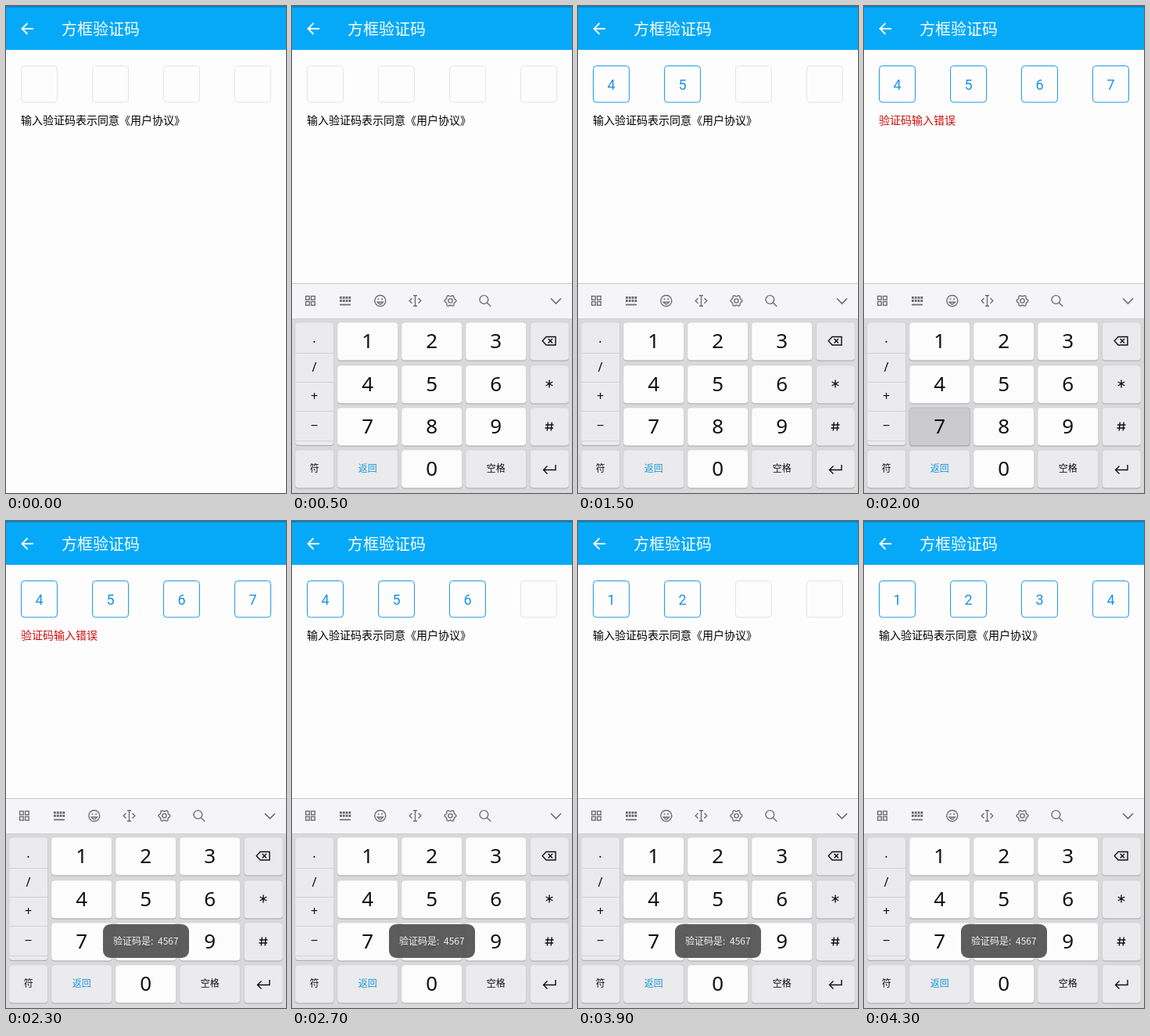
Animation, 358 px wide and 622 px high, one loop 5.3 s. Source, as an HTML page:

```html
<!DOCTYPE html>
<html lang="zh-CN">
<head>
<meta charset="utf-8">
<title>方框验证码</title>
<style>
  html, body { margin: 0; width: 100%; height: 100%; overflow: hidden; background: #fdfdfd; }
  svg { display: block; width: 358px; height: 622px; }
  text { font-family: "Noto Sans CJK SC", "Noto Sans CJK", "Noto Sans", sans-serif; }
  .digit { font: 18px Roboto, sans-serif; fill: #1c91e8; text-anchor: middle; }
  .num { font: 26px "Noto Sans", sans-serif; fill: #111; text-anchor: middle; }
  .sym { font: 16px "Noto Sans", sans-serif; fill: #111; text-anchor: middle; }
  .label { font-size: 12px; fill: #111; text-anchor: middle; }
  .icon { fill: none; stroke: #6f6f71; stroke-width: 1.4; }
  .glyph { fill: none; stroke: #111; stroke-width: 1.4; }
</style>
</head>
<body>
<svg id="stage" viewBox="0 0 358 622"></svg>
<script>
const LOOP = 5300, STEP = 100;
const NOTE = '输入验证码表示同意《用户协议》';
const ERROR = '验证码输入错误';
const COLS = [58, 140, 222], ROWS = [404, 459, 513, 567];

// [start time, entered code, pressed key]
const TIMELINE = [
  [0, '', ''],
  [1200, '', '4'], [1300, '4', ''],
  [1400, '4', '5'], [1500, '45', ''],
  [1600, '45', '6'], [1700, '456', ''],
  [2000, '4567', '7'], [2100, '4567', ''],
  [2600, '456', 'del'], [2700, '456', ''],
  [2800, '45', ''], [3000, '4', ''], [3200, '', ''],
  [3600, '', '1'], [3700, '1', ''],
  [3800, '1', '2'], [3900, '12', ''],
  [4000, '12', '3'], [4100, '123', ''],
  [4200, '123', '4'], [4300, '1234', '']
];

const range = n => [...Array(n).keys()];
const keyFill = side => side ? '#ebeaec' : '#fcfcfd';

function key(id, x, y, w, side, content = '', h = 48.5) {
  return `<rect x="${x}" y="${y + 1}" width="${w}" height="${h}" rx="4" fill="#a5a5a7"/>
    <rect id="key-${id}" data-fill="${keyFill(side)}" x="${x}" y="${y}" width="${w}" height="${h}" rx="4"
      fill="${keyFill(side)}" stroke="#c9c9cb" stroke-width=".5"/>${content}`;
}

const text = (cls, x, y, value, extra = '') =>
  `<text class="${cls}" x="${x}" y="${y}" ${extra}>${value}</text>`;

function numberKey(n) {
  const x = n ? COLS[(n - 1) % 3] : COLS[1];
  const y = ROWS[n ? Math.floor((n - 1) / 3) : 3];
  return key(n, x, y, 77.5, false, text('num', x + 38.7, y + 33, n));
}

function symbolColumn() {
  const lines = [443, 480, 517, 555].map(y => `M4 ${y}.5H53.5`).join('');
  return key('symbols', 4, 404, 49.5, true, '', 157) +
    `<path d="${lines}" stroke="#d2d1d4"/>` +
    text('sym', 28.5, 430, '.') + text('sym', 28.5, 467, '/') +
    text('sym', 28.5, 504, '+') + text('sym', 28.5, 541, '−');
}

function toolbar() {
  const grid = range(4).map(i =>
    `<rect x="${17.6 + i % 2 * 7}" y="${370.6 + (i >> 1) * 7}" width="4.6" height="4.6"/>`).join('');
  const dots = range(8).map(i =>
    `M${61 + i % 4 * 3.8} ${372.5 + (i >> 2) * 4}h2.8`).join('');
  const gear = range(72).map(i => {
    const a = i * Math.PI / 36, r = 6.5 + 0.9 * Math.cos(6 * a);
    return `${(202.5 + r * Math.cos(a)).toFixed(2)},${(376.5 + r * Math.sin(a)).toFixed(2)}`;
  }).join(' ');
  return `<rect y="354" width="358" height="45" fill="#f5f5f7"/>
    <path d="M0 354.5H358" stroke="#c8c8ca"/>
    <g class="icon">
      ${grid}
      <path d="${dots}" stroke-width="2.8"/><path d="M61 381.5h14" stroke-width="1.8"/>
      <circle cx="112.8" cy="376.5" r="7"/>
      <path d="M109 378.2q3.8 5 7.6 0z"/><path d="M109.6 374.4h1.8M114.2 374.4h1.8" stroke-width="1.8"/>
      <path d="M157.5 370v13M155 369.8h5M155 383.2h5M153.5 373.2l-3.3 3.3 3.3 3.3M161.5 373.2l3.3 3.3-3.3 3.3"/>
      <polygon points="${gear}"/><circle cx="202.5" cy="376.5" r="2.6"/>
      <circle cx="245.4" cy="375" r="5.4"/><path d="M249.3 379l5 4.8"/>
      <path d="M331 373.5l6.5 6.5 6.5-6.5" stroke-width="1.7"/>
    </g>`;
}

function sideKeys() {
  const star = range(3).map(i => {
    const a = Math.PI * (i / 3 + 0.5), dx = 5 * Math.cos(a), dy = 5 * Math.sin(a);
    return `M${329 - dx} ${482.5 - dy}L${329 + dx} ${482.5 + dy}`;
  }).join('');
  const glyph = (d, width = 1.4) => `<path class="glyph" d="${d}" stroke-width="${width}"/>`;
  const x = 304.5, w = 49.5;
  return key('del', x, 404, w, true, glyph('M325 422.5h12v10.5h-12l-4.8-5.2zM327.6 425l5.4 5.4M333 425l-5.4 5.4')) +
    key('star', x, 459, w, true, glyph(star)) +
    key('hash', x, 513, w, true, glyph('M327.3 531.5l-1 11M332.2 531.5l-1 11M324 535h10.5M323.5 539h10.5')) +
    key('enter', x, 567, w, true, glyph('M337 586v6.5h-15.5M326.5 587.5l-5 5 5 5', 1.9));
}

function keyboard() {
  return `<g id="keyboard">
    <rect y="399" width="358" height="223" fill="#d9d9db"/>
    <path d="M0 399.5H358" stroke="#cececf"/>
    ${toolbar()}${symbolColumn()}${range(10).map(numberKey).join('')}${sideKeys()}
    ${key('more', 4, 567, 49.5, true, text('label', 28.8, 595, '符'))}
    ${key('back', 58, 567, 77.5, true, text('label', 96.7, 595, '返回', 'style="fill:#1698dc"'))}
    ${key('space', 222, 567, 77.5, true, text('label', 260.7, 595, '空格'))}
  </g>`;
}

function codeBox(i) {
  const x = 19.5 + 91 * i;
  return `<rect id="box-${i}" x="${x}" y="76.5" width="46" height="46.5" rx="4" fill="none"/>
    <text id="digit-${i}" class="digit" x="${x + 23}" y="107"></text>`;
}

const stage = document.getElementById('stage');
stage.innerHTML = `
  <rect width="358" height="622" fill="#fdfdfd"/>
  <rect width="358" height="56" fill="#05a9f8"/>
  <rect width="358" height="2" fill="#0588d2"/>
  <path d="M35 29H20.5M27.5 22l-7 7 7 7" fill="none" stroke="#fff" stroke-width="1.9"/>
  <text x="71" y="36.5" font-size="20" fill="#fff">方框验证码</text>
  ${range(4).map(codeBox).join('')}
  <text id="note" x="19" y="151" font-size="14"></text>
  ${keyboard()}
  <g id="toast">
    <rect x="124" y="515" width="110" height="43" rx="9" fill="#555" fill-opacity=".95"/>
    <text x="137" y="541" font-size="12" fill="#f0f0f0">验证码是:</text>
    <text x="194" y="541" font-size="12" fill="#f0f0f0">4567</text>
  </g>`;

const el = id => document.getElementById(id);
const keys = [...stage.querySelectorAll('[data-fill]')];
const boxes = range(4).map(i => [el('box-' + i), el('digit-' + i)]);
const note = el('note');

function progress(t, start, duration) {
  const p = Math.min(1, Math.max(0, (t - start) / duration));
  return 1 - (1 - p) ** 2;
}

function slide(node, p, distance) {
  node.setAttribute('opacity', p);
  node.setAttribute('transform', `translate(0 ${distance * (1 - p)})`);
}

function render(t) {
  const [, code, pressed] = TIMELINE.filter(([start]) => start <= t).pop();
  boxes.forEach(([box, digit], i) => {
    box.setAttribute('stroke', code[i] ? '#2399e5' : '#e3e3e3');
    digit.textContent = code[i] || '';
  });
  keys.forEach(k => {
    const down = k.id === 'key-' + pressed;
    k.setAttribute('fill', down ? '#cbcacd' : k.dataset.fill);
    k.setAttribute('stroke', down ? '#a3a3a5' : '#c9c9cb');
  });
  const failed = code === '4567';
  note.textContent = failed ? ERROR : NOTE;
  note.setAttribute('fill', failed ? '#d00b0b' : '#000');
  slide(el('keyboard'), progress(t, 300, 200), 60);
  slide(el('toast'), progress(t, 2000, 300), 24);
}

function frame(now) {
  render(Math.floor(now % LOOP / STEP) * STEP);
  requestAnimationFrame(frame);
}
render(0);
requestAnimationFrame(frame);
</script>
</body>
</html>
```
